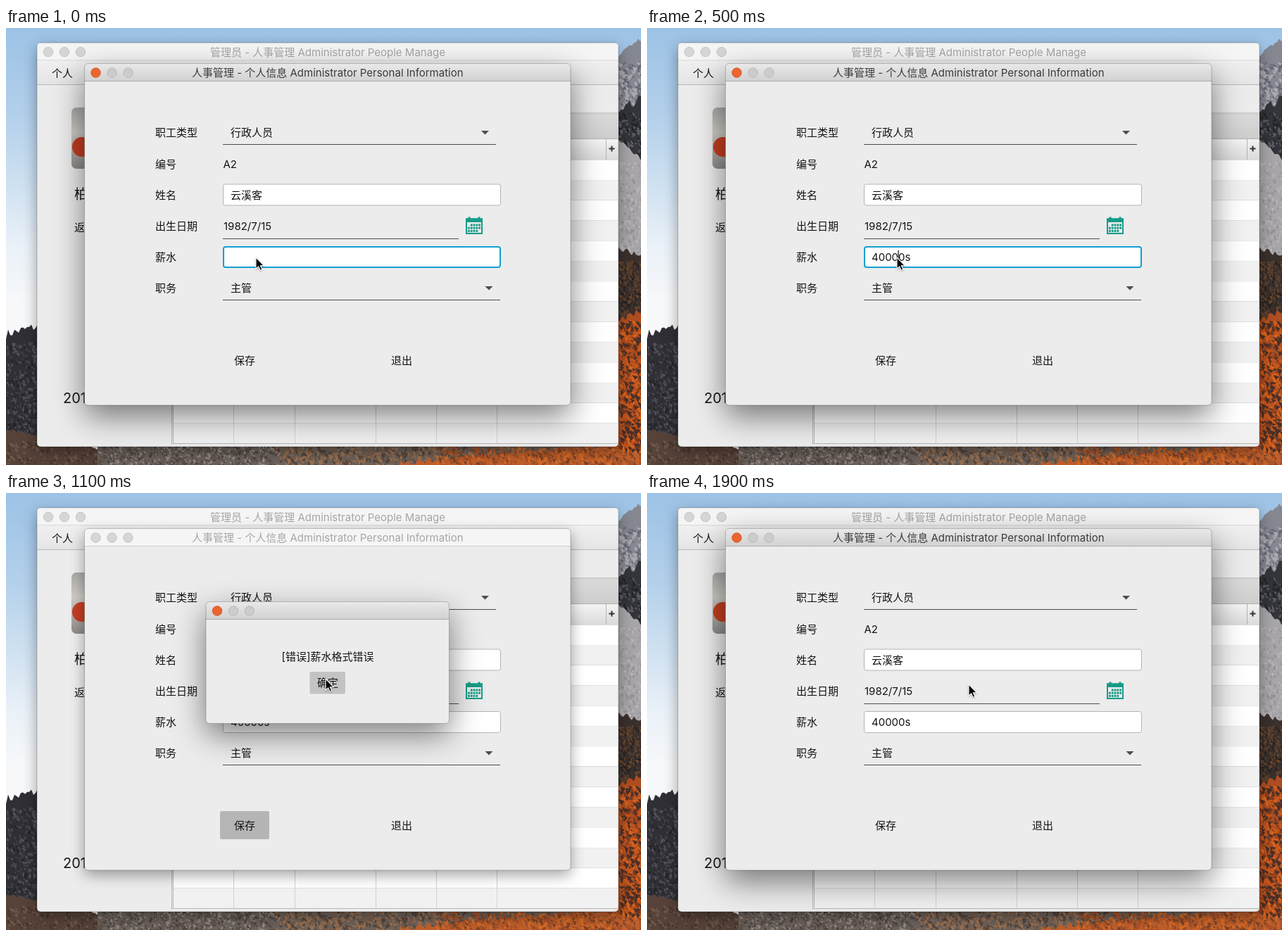
These frames come from a looping animation (902x621 px, 2000 ms). An HTML page:

```html
<!DOCTYPE html>
<html lang="zh-CN">
<head>
<meta charset="utf-8">
<title>人事管理</title>
<style>
  html, body { margin: 0; width: 902px; height: 621px; overflow: hidden; }
  svg { display: block; }
  text { font: 15px Inter, "Noto Sans CJK SC", "Noto Sans CJK", sans-serif; fill: #141414; white-space: pre; }
  .mid { text-anchor: middle; }
  .title { fill: #a6a6a6; }
  .bar { fill: #f5f5f5; }
  .edge { fill: #d0d0d0; }
  .light { fill: #d6d6d6; stroke: #c4c4c4; }
  .body { fill: #ececec; filter: drop-shadow(0 7px 10px rgba(0,0,0,.36)); }
  .on .title { fill: #3b3b3b; }
  .on .bar { fill: url(#bar); }
  .on .edge { fill: #aeaeae; }
  .on .light { fill: #cccccc; stroke: #b9b9b9; }
  .on .close { fill: #ea6530; stroke: #d95622; }
  .on .body { filter: drop-shadow(0 16px 22px rgba(0,0,0,.5)); }
  .frame { fill: none; stroke: #000; stroke-opacity: .22; }
  .field { fill: #fff; stroke: #b4b4b4; }
  .field.focus { stroke: #14a0d0; stroke-width: 2; x: 309px; y: 311px; width: 393px; height: 29px; }
  .line { fill: #4d4d4d; }
</style>
</head>
<body>
<svg id="stage" width="902" height="621" viewBox="0 0 902 621"></svg>
<script>
let seed = 7;
const rnd = () => (seed = seed * 16807 % 2147483647) / 2147483647;
const rect = (x, y, w, h, fill, more = '') =>
  `<rect x="${x}" y="${y}" width="${w}" height="${h}" fill="${fill}" ${more}/>`;
const line = (x, y, w) => `<rect class="line" x="${x}" y="${y}" width="${w}" height="1"/>`;
// y is the vertical centre of the glyphs
const text = (x, y, s, more = '') => `<text x="${x}" y="${y + 5.5}" ${more}>${s}</text>`;
const fade = (id, ...stops) => `<linearGradient id="${id}" x2="0" y2="1">${stops.map(([at, c]) =>
  `<stop offset="${at}" stop-color="${c}"/>`).join('')}</linearGradient>`;

// Small random flecks spread over a box
function flecks(x, y, w, h, count, size, colors) {
  return colors.map(color => {
    let d = '';
    for (let i = 0; i < count; i++) {
      const a = size * (.5 + rnd()), b = size * (.4 + rnd() * .8);
      d += `M${(x + rnd() * w).toFixed(1)} ${(y + rnd() * h).toFixed(1)}l${a.toFixed(1)} ${(b / 2).toFixed(1)}l${(-a / 2).toFixed(1)} ${b.toFixed(1)}z`;
    }
    return `<path d="${d}" fill="${color}"/>`;
  }).join('');
}

// Land with a jagged upper edge
function ridge(x0, y0, x1, y1, bottom, rough, fill) {
  let d = `M${x0} ${bottom}`;
  for (let x = x0; x <= x1; x += 3)
    d += `L${x} ${(y0 + (y1 - y0) * (x - x0) / (x1 - x0) - rnd() * rough).toFixed(1)}`;
  return `<path d="${d}L${x1} ${bottom}z" fill="${fill}"/>`;
}

function wallpaper() {
  return rect(0, 0, 902, 621, 'url(#sky)') +
    ridge(0, 442, 48, 430, 621, 14, '#2f2f35') +
    flecks(0, 446, 44, 130, 110, 4, ['#222328', '#434349', '#55525a']) +
    ridge(0, 572, 150, 604, 621, 5, '#574239') +
    flecks(0, 585, 140, 36, 90, 4, ['#6f584a', '#43352f']) +
    ridge(130, 594, 903, 594, 621, 2, '#6c625c') +
    flecks(130, 592, 260, 29, 190, 4, ['#45413f', '#948b85', '#5c5049']) +
    flecks(380, 592, 270, 29, 190, 5, ['#7d604b', '#54443a', '#9a7152']) +
    ridge(560, 622, 903, 592, 621, 8, '#c05f2b') +
    flecks(610, 594, 292, 27, 180, 5, ['#da6d25', '#7d4325', '#a9532a']) +
    ridge(868, 42, 904, 18, 130, 7, '#858891') +
    flecks(869, 46, 33, 66, 60, 5, ['#666973', '#a9abb1']) +
    ridge(868, 126, 904, 106, 210, 14, '#34353a') +
    flecks(869, 118, 33, 60, 60, 4, ['#222328', '#5e5f66']) +
    ridge(868, 160, 904, 190, 330, 5, '#a7a5a8') +
    flecks(869, 190, 33, 130, 70, 4, ['#949295', '#b9b7b9']) +
    ridge(868, 322, 904, 325, 430, 12, '#3a302c') +
    flecks(869, 330, 33, 95, 70, 4, ['#242021', '#70482b', '#59402f']) +
    ridge(868, 424, 904, 405, 600, 10, '#b04d20') +
    flecks(869, 415, 33, 185, 120, 6, ['#de671d', '#7a3b20', '#c9571c', '#4a3027']);
}

function win(id, x, y, w, h, title, inside) {
  const lights = [16, 39, 62].map((dx, i) =>
    `<circle class="light ${i ? '' : 'close'}" cx="${x + dx}" cy="${y + 13}" r="6.7"/>`).join('');
  return `<g id="${id}">
    <rect class="body" x="${x}" y="${y}" width="${w}" height="${h}" rx="5"/>
    <path class="bar" d="M${x} ${y + 25}v-20q0-5 5-5h${w - 10}q5 0 5 5v20z"/>
    <rect class="edge" x="${x}" y="${y + 24.5}" width="${w}" height="1"/>
    ${lights}${text(x + w / 2, y + 13, title, 'class="title mid"')}${inside}
    <rect class="frame" x="${x}" y="${y}" width="${w}" height="${h}" rx="5"/></g>`;
}

function staff() {
  let rows = '';
  for (let i = 0; i < 14; i++) {
    const y = 187.5 + i * 28.8;
    rows += rect(238, y, 631, 28.8, i % 2 ? '#f1f1f1' : '#fff') + rect(238, Math.round(y + 28), 631, 1, '#dedede');
  }
  const columns = [323, 410, 525, 611, 697].map(x => rect(x, 188, 1, 402, '#d2d2d2')).join('');
  return rect(44, 46.5, 826, 33.5, 'url(#menu)') + rect(44, 80, 826, 1, '#b8b8b8') +
    text(65, 64, '个人') +
    rect(93, 113, 80, 87, 'url(#photo)', 'rx="7"') +
    '<ellipse cx="108" cy="169" rx="14" ry="14" fill="#c43e22"/>' +
    text(97, 237, '柏', 'style="font-size:19px"') + text(97, 283, '返回') +
    text(81, 527.5, '2019', 'style="font-size:20px"') +
    rect(235, 120, 1, 472, '#b5b5b5') + rect(237, 120, 1, 471, '#b5b5b5') +
    rect(238, 120, 631, 37, 'url(#head)') + rect(238, 157, 631, 1, '#b0b0b0') +
    rect(238, 158, 631, 29, 'url(#cells)') + rect(238, 187, 631, 1, '#bcbcbc') +
    rows + columns + rect(237, 590, 632, 1, '#b8b8b8') + rect(852, 158, 1, 29, '#b4b4b4') +
    '<path d="M856.5 171.5h8M860.5 167.5v8" stroke="#333" stroke-width="2"/>';
}

function calendar() {
  let days = '';
  for (let i = 1; i < 14; i++)
    days += rect(656 + i % 5 * 3.8, 278.5 + Math.floor(i / 5) * 4.2, 2.8, 3, '#159b87');
  return `<path d="M654 271.5h22v20.5h-22z" fill="none" stroke="#159b87" stroke-width="2"/>
    <path d="M653 270.5h24v5.5h-24zM656.5 268.5h3v3h-3zM670.5 268.5h3v3h-3z" fill="#159b87"/>${days}`;
}

function form() {
  const labels = ['职工类型', '编号', '姓名', '出生日期', '薪水', '职务'];
  const rows = [148, 193, 237, 281, 325, 369];
  const arrow = (x, y) => `<path class="line" d="M${x} ${y}h11l-5.5 5.5z"/>`;
  const field = (y, id) => `<rect id="${id}" class="field" x="308.5" y="${y}" width="394" height="30" rx="3"/>`;
  return labels.map((s, i) => text(212, rows[i], s)).join('') +
    text(319, 148, '行政人员') + arrow(675, 146) + line(308, 165, 388) +
    text(308.5, 193, 'A2') +
    field(222, 'name') + text(319, 237, '云溪客') +
    text(309, 281, '1982/7/15') + line(308, 299, 335) + calendar() +
    field(310.5, 'pay') + text(319, 325, '', 'id="amount"') +
    '<rect id="caret" y="316" width="1.2" height="19" fill="#111"/>' +
    text(319, 369, '主管') + arrow(680.5, 367) + line(308, 386, 394) +
    rect(304, 452, 70, 40, '#b5b5b5', 'id="save" rx="2"') +
    text(339, 472, '保存', 'class="mid"') + text(562, 472, '退出', 'class="mid"');
}

stage.innerHTML = `<defs>
  ${fade('sky', [0, '#9cc2e6'], [.2, '#b3d0eb'], [.36, '#cfe1f1'], [.5, '#eaf1f8'], [.62, '#f6f8fa'])}
  ${fade('bar', [0, '#e9e9e9'], [1, '#d1d1d1'])}
  ${fade('menu', [0, '#f0f0f0'], [1, '#e5e5e5'])}
  ${fade('head', [0, '#c9c9c9'], [.1, '#dadada'], [1, '#cdcdcd'])}
  ${fade('cells', [0, '#f4f4f4'], [1, '#dadada'])}
  ${fade('photo', [0, '#aaa8a6'], [.4, '#cfccc8'], [1, '#8d8a88'])}
  </defs>` + wallpaper() +
  win('main', 44, 21, 826, 574, '管理员 - 人事管理 Administrator People Manage', staff()) +
  win('info', 111.5, 50.5, 690.5, 485.5, '人事管理 - 个人信息 Administrator Personal Information', form()) +
  win('dialog', 284, 154.5, 345.5, 173, '',
    text(457, 232.5, '', 'id="message" class="mid"') +
    rect(431.5, 254, 50.5, 31.5, '#c3c3c3', 'rx="2"') + text(457, 269, '确定', 'class="mid"')) +
  `<path id="pointer" d="M0 0V16.2L3.7 12.8 6.2 18.4 8.8 17.3 6.4 11.8H11.5z" fill="#000"
    stroke="#fff" stroke-width="1.1" style="filter:drop-shadow(0 1px 1px rgba(0,0,0,.3))"/>`;

// Each entry changes part of the state from its time on (ms)
const script = [
  [0, { amount: '', caret: 0, focus: true, message: '', pressed: false, x: 355, y: 326 }],
  [100, { amount: '4', caret: 1 }],
  [200, { amount: '400', caret: 3 }],
  [300, { amount: '40000', caret: 5 }],
  [400, { amount: '40000s', caret: 6 }],
  [500, { caret: 4 }],
  [600, { x: 354, y: 372 }],
  [700, { x: 352, y: 450 }],
  [800, { y: 467 }],
  [900, { pressed: true }],
  [1000, { focus: false, message: '[错误]薪水格式错误', x: 410, y: 350 }],
  [1100, { x: 454, y: 264 }],
  [1300, { message: '[警告]，该岗位已经有人，无法进行人事调动!', x: 457, y: 272 }],
  [1800, { message: '', pressed: false }]
];

const $ = id => document.getElementById(id);
const show = (id, on) => $(id).style.display = on ? '' : 'none';

function draw(now) {
  const t = now % 2000;
  const s = Object.assign({}, ...script.filter(([at]) => at <= t).map(([, change]) => change));
  $('amount').textContent = s.amount;
  $('pay').classList.toggle('focus', s.focus);
  show('caret', s.focus && s.caret);
  if (s.caret) $('caret').setAttribute('x', 318.4 + $('amount').getSubStringLength(0, s.caret));
  show('save', s.pressed);
  show('dialog', s.message);
  $('message').textContent = s.message;
  $('info').classList.toggle('on', !s.message);
  $('dialog').classList.toggle('on', !!s.message);
  $('pointer').setAttribute('transform', `translate(${s.x} ${s.y})`);
}

const start = performance.now();
function tick() {
  draw(performance.now() - start);
  requestAnimationFrame(tick);
}
tick();
</script>
</body>
</html>
```
